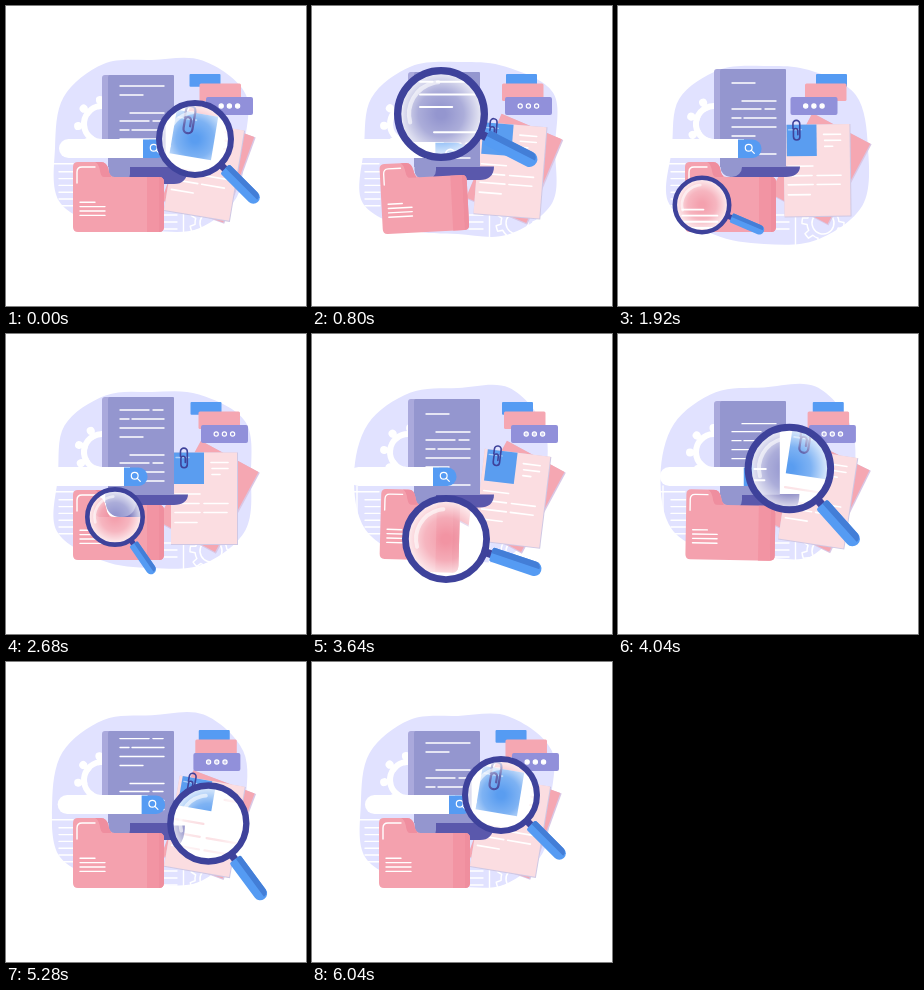
Write an HTML page with a canvas that moves like this. It is 300x300 px and loops after 6080 ms.

```html
<!DOCTYPE html>
<html lang="en">
<head>
<meta charset="utf-8">
<title>Document search</title>
<style>
html, body { margin: 0; width: 100%; height: 100%; overflow: hidden; background: #fff; }
canvas { display: block; width: 100vw; height: 100vh; }
</style>
</head>
<body>
<canvas id="stage"></canvas>
<script>
const LOOP = 6080, STEP = 40, TAU = Math.PI * 2, DEG = Math.PI / 180;
const canvas = document.getElementById('stage');
const c = canvas.getContext('2d');

// Smooth periodic interpolation without overshoot; gain is added per loop.
function track(times, vals, gain = 0) {
  const n = times.length;
  const point = k => {
    const turn = Math.floor(k / n), i = k - turn * n;
    return [times[i] + turn * LOOP, vals[i] + turn * gain];
  };
  const rate = k => {
    const a = point(k), b = point(k + 1);
    return (b[1] - a[1]) / (b[0] - a[0]);
  };
  const slope = k => {
    const p = rate(k - 1), q = rate(k);
    return p * q <= 0 ? 0 : 2 * p * q / (p + q);
  };
  return t => {
    let k = n - 1;
    while (k > 0 && times[k] > t) k--;
    const a = point(k), b = point(k + 1), h = b[0] - a[0], u = (t - a[0]) / h;
    const u2 = u * u, u3 = u2 * u;
    return a[1] * (2 * u3 - 3 * u2 + 1) + b[1] * (3 * u2 - 2 * u3) +
      h * (slope(k) * (u3 - 2 * u2 + u) + slope(k + 1) * (u3 - u2));
  };
}

const BEATS = [0, 800, 1920, 2680, 3640, 4600];
const beat = (...v) => track(BEATS, v);
const scene = {
  barX: beat(53, 41, 36, 34, 37, 49),
  docTop: beat(69, 66, 63, 63, 65, 69),
  baseEnd: beat(178, 174, 171, 171, 173.5, 178),
  scroll: track(BEATS, [0, 34, 65, 92, 115, 134], 159),
  folder: beat(0, -3, 0, 0, 1.5, 0),
  folderWidth: beat(1, 0.95, 1, 1, 0.97, 1),
  blueX: beat(183.5, 194, 198, 184.5, 190, 200),
  pinkX: beat(193.5, 190, 187, 192.5, 192, 186),
  chatX: beat(200, 193, 172.5, 195, 199, 177.5),
  dotFill: beat(1, 0, 1, 0, 0.5, 0),
  front: beat(9.5, 4.5, -0.7, 0, 7, 10),
  frontX: beat(198, 198, 199, 198, 200, 199),
  back: beat(20, 23, 28, 28.5, 28.5, 22),
  gear: beat(175, 176, 198, 197, 185, 173)
};
// Outline distances every 30 degrees, clockwise from the right.
const blobRadii = [
  beat(92, 97, 104, 99, 88, 94),
  beat(98, 109, 114, 108, 88, 94),
  beat(93, 100, 106, 102, 96, 90),
  beat(83, 86, 96, 92, 84, 79),
  beat(92, 94, 100, 98, 95, 87),
  beat(107, 110, 110, 110, 107, 106),
  beat(97, 94, 92, 94, 104, 102),
  beat(102, 100, 98, 101, 104, 104),
  beat(97, 94, 90, 93, 96, 97),
  beat(88, 86, 82, 84, 88, 89),
  beat(101, 94, 90, 94, 102, 104),
  beat(108, 110, 106, 108, 99, 103)
];

const LENS_T = [0, 300, 800, 1920, 2680, 3250, 3640, 3900, 4250, 4600, 5150, 5780];
const lensTrack = (...v) => track(LENS_T, v);
const lens = {
  x: lensTrack(189, 187, 129, 84, 109, 133, 134, 158, 185, 187, 204, 189),
  y: lensTrack(133, 132, 108, 199, 183, 206, 205, 160, 109, 107, 165, 133),
  r: lensTrack(39, 39, 47, 29.5, 30, 45, 44, 44, 46, 46, 42, 39),
  a: lensTrack(45, 45, 27, 23.3, 55.5, 19, 18.6, 35, 63, 64.7, 56, 45),
  fx: lensTrack(189, 187, 129, 88, 109, 145, 147, 165, 185, 187, 200, 189),
  fy: lensTrack(135, 134, 113, 193, 171, 202, 203, 165, 120, 120, 162, 135)
};

function box(x, y, w, h, fill, r = 0) {
  c.fillStyle = fill;
  c.beginPath();
  c.roundRect(x, y, w, h, r);
  c.fill();
}
function disc(x, y, r, fill) {
  c.fillStyle = fill;
  c.beginPath();
  c.arc(x, y, r, 0, TAU);
  c.fill();
}
function pen(color, width) {
  c.strokeStyle = color;
  c.lineWidth = width;
  c.lineCap = c.lineJoin = 'round';
}
function rule(x1, x2, y) {
  c.beginPath();
  c.moveTo(x1, y);
  c.lineTo(x2, y);
  c.stroke();
}
const shape = (d, fill) => { c.fillStyle = fill; c.fill(new Path2D(d)); };
const trace = d => c.stroke(new Path2D(d));
function posed(x, y, deg, draw) {
  c.save();
  c.translate(x, y);
  c.rotate(deg * DEG);
  draw();
  c.restore();
}

function blob(t) {
  const n = blobRadii.length;
  const pts = blobRadii.map((r, i) => {
    const a = i * TAU / n, d = r(t);
    return [146 + d * Math.cos(a), 142 + d * Math.sin(a)];
  });
  const at = i => pts[(i + n) % n];
  c.fillStyle = '#e1e2ff';
  c.beginPath();
  c.moveTo(...at(0));
  for (let i = 0; i < n; i++) {
    const [p, q, r, s] = [at(i - 1), at(i), at(i + 1), at(i + 2)];
    c.bezierCurveTo(q[0] + (r[0] - p[0]) / 6, q[1] + (r[1] - p[1]) / 6,
      r[0] - (s[0] - q[0]) / 6, r[1] - (s[1] - q[1]) / 6, r[0], r[1]);
  }
  c.fill();
}

function backdrop(t) {
  blob(t);
  const turn = scene.gear(t);
  posed(96, 118, turn, () => {
    for (let i = 0; i < 8; i++) {
      c.rotate(TAU / 8);
      box(15, -2.5, 9, 5, '#fff');
      disc(24, 0, 4, '#fff');
    }
    pen('#fff', 6);
    c.beginPath();
    c.arc(0, 0, 18, 0, TAU);
    c.stroke();
  });
  pen('#fff', 1.4);
  rule(40, 67, 157.8);
  for (let i = 0; i < 6; i++) rule(53, 68, 165.8 + i * 6.8);
  for (let i = 0; i < 3; i++) rule(157, 171, 209 + i * 7);
  trace('M45 152V212 M177.5 204V240');
  posed(205, 217, turn, () => {
    pen('#fff', 1.5);
    c.beginPath();
    c.arc(0, 0, 11, 0, TAU);
    c.stroke();
    c.beginPath();
    for (let i = 0; i < 8; i++) {
      const a = i * TAU / 8;
      c.arc(0, 0, 16, a, a + 0.38);
      c.arc(0, 0, 21, a + 0.45, a + 0.72);
    }
    c.closePath();
    c.stroke();
  });
}

function papers(t, inLens) {
  posed(202, 163, scene.back(t), () => {
    box(-33, -46, 67, 92, '#d9c7e5');
    box(-33, -46, 65.5, 91, '#f5a7b2');
  });
  posed(scene.frontX(t), 164.5, scene.front(t), () => {
    if (!inLens) box(-33, -46, 67, 92.5, '#cfc8e4');
    box(-33, -46, 66, 91.5, inLens ? '#fff' : '#fbdde1');
    pen(inLens ? '#fbdde1' : '#fff', 1.6);
    rule(7, 24, -36);
    rule(8, 24, -30);
    rule(8, 16, -24);
    rule(-29, -4, -4.5);
    rule(-29, -5, 5);
    rule(0, 24, 5);
    rule(-29, -4, 14);
    rule(0, 23, 14);
    rule(-29, -7, 24);
    box(-30, -46, 30, 31.5, '#5a9df0');
    pen('#a9cef9', 1.3);
    rule(-28, -15, -41);
    pen('#3e429b', 1.6);
    trace('M-23.5 -42V-47a3.4 3.4 0 0 1 6.8 0v13a3.2 3.2 0 0 1 -6.4 0v-6a2.2 2.2 0 0 1 4.4 0v4');
  });
}

function labels(t) {
  box(scene.blueX(t), 68, 31, 12.8, '#559bf3', 1);
  box(scene.pinkX(t), 77.5, 41.5, 17.5, '#f5a7b2', 1.5);
  const x = scene.chatX(t);
  box(x, 91, 47, 18, '#9190da', 2);
  pen('#fff', 1.2);
  for (let i = 0; i < 3; i++) {
    disc(x + 15.2 + i * 8.2, 100, 2.1, `rgba(255,255,255,${scene.dotFill(t)})`);
    c.stroke();
  }
}

function docText(t) {
  const rows = [[0, 124, 158], [8, 114, 143], [8, 147, 157], [17, 114, 123],
    [17, 126, 158], [26, 114, 158], [35, 114, 137]];
  pen('#fff', 1.4);
  const start = 107 - scene.scroll(t) % 53;
  for (let y = start - 106; y < 165; y += 53)
    for (const [dy, a, b] of rows) rule(a, b, y + dy);
}

function sheet(t) {
  const top = scene.docTop(t), end = scene.baseEnd(t);
  shape(`M108 160.5H182C182 ${end - 4} 176 ${end} 168 ${end}H113Z`, '#5a58ac');
  box(96, top, 14, 152 - top, '#aaa9dc', [3, 0, 0, 0]);
  box(102, top, 66, 161 - top, '#9496cf', [2, 1, 0, 0]);
  box(102.5, 150, 21.5, end - 150, '#9496cf', [0, 0, 10, 10]);
  c.save();
  c.beginPath();
  c.rect(102, top + 7, 66, 146 - top);
  c.clip();
  docText(t);
  c.restore();
}

function searchBar(t) {
  const x = scene.barX(t);
  box(x, 133, 90, 19, '#fff', [9.5, 0, 0, 9.5]);
  box(x + 84, 133.5, 23.5, 18.5, '#559bf3', [0, 9, 9, 0]);
  pen('#fff', 1.2);
  c.beginPath();
  c.arc(x + 94.7, 141.7, 3.4, 0, TAU);
  c.stroke();
  trace(`M${x + 97.3} 144.3l3 3`);
}

function folder(t) {
  posed(112.5, 194, scene.folder(t), () => {
    c.scale(scene.folderWidth(t), 1);
    c.translate(-112.5, -195);
    c.translate(0, 1);
    const d = 'M67 161q0-5 5-5H95q6 0 7.5 8q1 7 6 7H153q5 0 5 5V221q0 5-5 5H72q-5 0-5-5Z';
    shape(d, '#f4a1ae');
    c.save();
    c.clip(new Path2D(d));
    shape('M92 156H105V171H98Q95 171 94 165Q93 158 89 156Z', '#ef8e9f');
    box(141, 171, 12, 56, '#f294a3');
    box(153, 171, 6, 56, '#ef8e9e');
    c.restore();
    pen('#fff', 1.4);
    trace('M71 177V166q0-5 5-5H89');
    rule(74, 89, 196.3);
    for (let i = 0; i < 3; i++) rule(74, 99, 200.6 + i * 4.4);
  });
}

function objects(t, inLens) {
  papers(t, inLens);
  labels(t);
  sheet(t);
  searchBar(t);
  folder(t);
}

function magnifier(t) {
  const x = lens.x(t), y = lens.y(t), r = lens.r(t), rim = r * 0.155;
  posed(x, y, lens.a(t), () => {
    box(r * 0.95, -r * 0.09, r * 0.2, r * 0.18, '#3e429b');
    box(r * 1.08, -r * 0.165, r * 1.2, r * 0.33, '#559bf3', [r * 0.05, r * 0.16, r * 0.16, r * 0.05]);
    box(r * 1.08, -r * 0.165, r * 1.15, r * 0.14, '#437ed7', [r * 0.05, r * 0.13, 0, 0]);
  });
  c.save();
  c.beginPath();
  c.arc(x, y, r - rim / 2, 0, TAU);
  c.clip();
  disc(x, y, r, '#fff');
  c.save();
  c.translate(x, y);
  c.scale(1.4, 1.4);
  c.translate(-lens.fx(t), -lens.fy(t));
  objects(t, true);
  c.restore();
  const haze = c.createRadialGradient(x, y, r * 0.1, x, y, r * 0.87);
  haze.addColorStop(0, 'rgba(255,255,255,0)');
  haze.addColorStop(0.5, 'rgba(255,255,255,.22)');
  haze.addColorStop(1, 'rgba(255,255,255,.8)');
  disc(x, y, r, haze);
  pen('rgba(255,255,255,.6)', r * 0.09);
  c.beginPath();
  c.arc(x, y, r * 0.68, 165 * DEG, 265 * DEG);
  c.stroke();
  c.restore();
  pen('#3e429b', rim);
  c.beginPath();
  c.arc(x, y, r - rim / 2, 0, TAU);
  c.stroke();
}

function render(t) {
  const dpr = window.devicePixelRatio || 1;
  const w = Math.round(innerWidth * dpr), h = Math.round(innerHeight * dpr);
  if (canvas.width !== w || canvas.height !== h) {
    canvas.width = w;
    canvas.height = h;
  }
  c.setTransform(w / 300, 0, 0, h / 300, 0, 0);
  c.fillStyle = '#fff';
  c.fillRect(0, 0, 300, 300);
  backdrop(t);
  objects(t, false);
  magnifier(t);
}

const begin = performance.now();
function tick() {
  const t = (performance.now() - begin) % LOOP;
  render(Math.floor(t / STEP) * STEP);
  requestAnimationFrame(tick);
}
tick();
</script>
</body>
</html>
```
